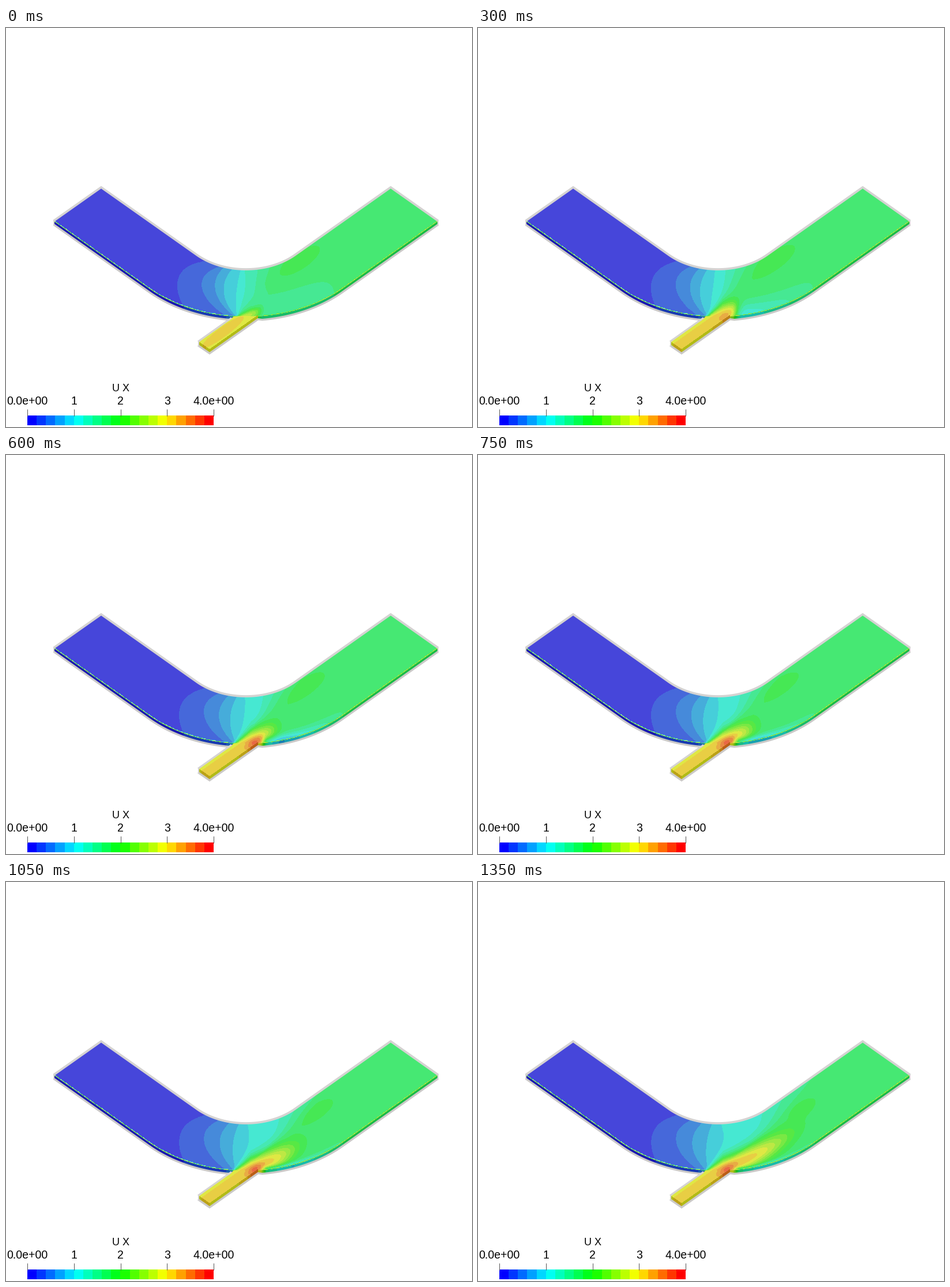
These frames come from a looping animation (808 by 693 pixels, 1500 ms). A matplotlib script:

```python
import colorsys

import numpy as np
import matplotlib.pyplot as plt
from matplotlib.animation import FuncAnimation
from matplotlib.patches import Rectangle
from matplotlib.path import Path

W, H, DPI = 808, 693, 64
PT = 72 / DPI
FRAMES, STEP = 10, 150
LEVELS = 20

# Duct seen at an angle: circles in plan become ellipses of ratio SQ.
SQ = 0.7071
CX, CY, R_IN, R_OUT = 416, 334.2, 120, 236.4
SIDE, RIM = 5.5, 6.6

# Left borders of bands 1 to 8 at the inner wall and in mid duct, first and last.
BAND = np.arange(1, 9)
TOP = np.array([[349, 374, 380, 394, 408, 414, 437, 462],
                [349, 372, 391, 407, 421, 494, 530, 585]])
MID = np.array([[298, 340, 363, 378, 401, 414, 428, 445],
                [301, 344, 372, 397, 426, 476, 488, 500]])
FOOT = 398 + 0.6 * BAND - 90 * np.exp(-1.7 * (BAND - 1))
V_MID = 0.4 + 0.35 / BAND**2
PACE = np.maximum(0.25 * BAND - 0.4, 0.1)


def rainbow(k):
    return np.array(colorsys.hsv_to_rgb((1 - k / (LEVELS - 1)) * 2 / 3, 1, 1))


TOP_COLORS = [(np.array([70, 70, 68]) + np.array([162, 162, 150]) * rainbow(k)) / 255
              for k in range(LEVELS)]
SIDE_COLORS = [(np.array([24, 24, 22]) + np.array([163, 163, 155]) * rainbow(k)) / 255
               for k in range(LEVELS)]


def bend(r):
    """Left end, arc and right end of a duct wall of plan radius r."""
    th = np.linspace(-np.pi / 4, np.pi / 4, 60)
    arc = np.c_[CX + r * np.sin(th), CY + SQ * r * np.cos(th)]
    dx, y = 251 + (r - R_IN) * SQ, 276.7 + (r - R_IN) / 2
    return np.vstack([[CX - dx, y], arc, [CX + dx, y]])


def across(x, y):
    """Place between the inner wall (0) and the outer wall (1)."""
    px, py = np.abs(x - CX), (y - CY) / SQ
    r = np.where(px > py, (px + py) * SQ, np.hypot(px, py))
    return (r - R_IN) / (R_OUT - R_IN)


def bump(x, y, cx, cy, length, width, slope):
    """Gaussian stretched along a rising direction."""
    c, s = np.cos(slope), np.sin(slope)
    a, b = (x - cx) * c - (y - cy) * s, (x - cx) * s + (y - cy) * c
    return np.exp(-(a / length)**2 - (b / width)**2)


def bands(x, v, u):
    """Main flow: rises by one across each border, then levels off."""
    ease = u**PACE
    top = TOP[0] + (TOP[1] - TOP[0]) * ease
    mid = MID[0] + (MID[1] - MID[0]) * ease
    val, last = 0.2, None
    for a, b, c, m in zip(top, mid, FOOT, V_MID):
        edge = (a * (v - m) * (v - 1) / m + b * v * (v - 1) / (m * (m - 1))
                + c * v * (v - m) / (1 - m))
        last = edge - 60 if last is None else last
        val = val + np.clip((x - last) / np.maximum(edge - last, 1), 0, 1)
        last = edge
    return val - 0.2 + 0.5 * np.clip((x - last) / 20, 0, 1)


def duct(x, y, t):
    u, v = t / (FRAMES - 1), np.clip(across(x, y), 0, 1)
    val = bands(x, v, u)

    # Fast patch drifting down the duct
    late = u**2.5
    val = val + bump(x, y, 508 + 55 * late, 407 - 14 * late, 58 - 28 * u**2, 20 - 7 * u, 0.6)

    # Plume from the side inlet, growing along a curved axis
    p = x - 418
    n = y - (500 - 0.33 * p - 0.0013 * p**2)
    width = (19 - 10 * np.exp(-t)) * np.clip((x - 385) / 40, 0.05, 1)
    reach = 23 * np.exp(0.18 * t)
    peak = min(14 + 0.9 * t, 15.7)
    val = val + (peak - val) * np.exp(-(p / reach)**4 - (n / width)**2)

    # Slow layer on the outer wall, first wide and weak, then thin and strong
    grown = min(t / 4, 1)
    wide = 1.1 * np.clip(1 - ((x - 440) / 175)**2, 0, 1) * np.clip((x - 410) / 20, 0, 1)
    thin = 6 * np.clip(1 - (x - 447) / 150, 0, 1) * np.clip((x - 442) / 10, 0, 1)
    depth = (1 - grown) * wide + grown * thin
    return val - depth * np.exp(-((1 - v) / (0.04 + 0.52 * np.exp(-t / 2.2)))**2)


def inlet(x, y, t):
    g = min(t / 2, 1)
    q = (x + y / SQ - 1103) / 39.8
    off = ((q - 0.5 - 0.15 * g) / 0.34)**2 + (1 - g) * ((x - 376) / 36)**2
    return np.clip(15.4 - 0.4 * off, 14.2, 15.6)


def hot_spot(x, y, t):
    return 3 * min(t / 4, 1) * bump(x, y, 431, 501, 16, 8, 0.6)


fig = plt.figure(figsize=(W / DPI, H / DPI), dpi=DPI, facecolor="white")
ax = fig.add_axes([0, 0, 1, 1])
ax.set(xlim=(0, W), ylim=(H, 0))
ax.axis("off")

inner, outer = bend(R_IN), bend(R_OUT)
face = np.vstack([inner, outer[::-1], inner[:1]])
LEFT, FRONT, MOUTH = (333, 544.7), (353, 558.5), (437, 499.2)
pipe = np.array([LEFT, (397, 499.7), MOUTH, FRONT, LEFT])
clip = Path.make_compound_path(Path(face, closed=True), Path(pipe, closed=True))
gx, gy = np.meshgrid(np.arange(80, 753, 1.5), np.arange(272, 568, 1.5))
in_pipe = across(gx, gy) > 1
drawn = []


def fill(x, y, val, colors, z):
    cs = ax.contourf(x, y, np.clip(val, 0.1, LEVELS - 0.1), levels=np.arange(LEVELS + 1),
                     colors=colors, zorder=z)
    drawn.append(cs)
    return cs


def side(x, y, val, z):
    """Vertical wall below an edge, coloured by the values along it."""
    fill(np.stack([x, x]), np.stack([y, y + SIDE]), np.stack([val, val]), SIDE_COLORS, z)


def line(pts, color, lw=3.8):
    pts = np.asarray(pts, float)
    ax.plot(pts[:, 0], pts[:, 1], color=color, lw=lw * PT, zorder=5,
            solid_joinstyle="miter", solid_capstyle="butt")


def lower(pts):
    return np.asarray(pts, float) + [0, RIM]


LIGHT, SHADE = "#d5d3d2", "#cbc9c8"
line(lower(outer[outer[:, 0] < 389]), SHADE, 3.4)
line(lower(np.vstack([[LEFT, FRONT, MOUTH], outer[outer[:, 0] > 438]])), SHADE, 3.4)
line(np.vstack([outer[:1], inner, outer[-1:]]), LIGHT)
line([LEFT, (391, 503.5)], LIGHT, 3.2)
for x, y0, y1 in ((83, 333, 344), (749, 333, 344), (333.5, 543.5, 552.5)):
    line([(x, y0), (x, y1)], LIGHT, 2)

# Colour legend
X0, X1 = 37, 360
cell = (X1 - X0) / LEVELS
for k in range(LEVELS):
    ax.add_patch(Rectangle((round(X0 + k * cell), 673), cell + 1 if k < LEVELS - 1 else cell,
                           17.3, fc=rainbow(k), lw=0))
font = dict(family="Liberation Sans", color="black", ha="center", va="baseline")
for i, s in enumerate(["0.0e+00", "1", "2", "3", "4.0e+00"]):
    x = X0 + (X1 - X0) * i / 4
    line([(x, 661.5), (x, 673.5)], "#555555", 1)
    ax.text(x, 654, s, fontsize=19.5 * PT, **font)
ax.text(199, 631, "U X", fontsize=18 * PT, **font)


def update(t):
    while drawn:
        drawn.pop().remove()

    wx = np.linspace(outer[0, 0], outer[-1, 0], 668)
    wy = np.interp(wx, outer[:, 0], outer[:, 1])
    side(wx, wy, duct(wx, wy, t), 1)

    val = np.where(in_pipe, inlet(gx, gy, t), duct(gx, gy, t)) + hot_spot(gx, gy, t)
    fill(gx, gy, val, TOP_COLORS, 2).set_clip_path(clip, ax.transData)

    for a, b in ((LEFT, FRONT), (FRONT, MOUTH)):
        px, py = np.linspace(a, b, 60).T
        side(px, py, inlet(px, py, t) + hot_spot(px, py, t), 3)
    return []


anim = FuncAnimation(fig, update, frames=FRAMES, init_func=lambda: update(0),
                     interval=STEP, repeat=True, repeat_delay=0, blit=False)
plt.show()
```
